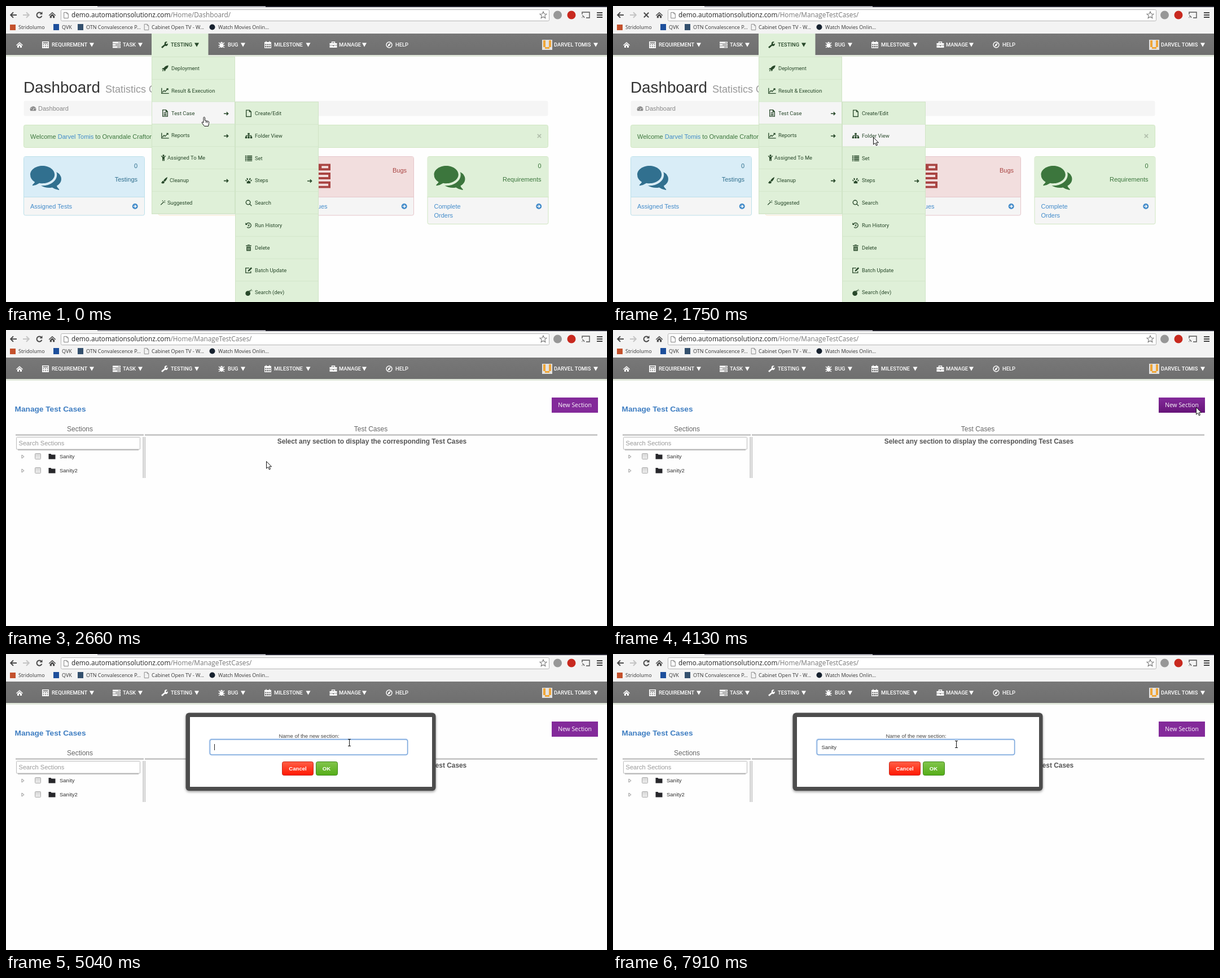
These frames come from a looping animation (1065 px wide and 526 px high, 8 s). An HTML page with a canvas:

```html
<!DOCTYPE html>
<html lang="en">
<head>
<meta charset="utf-8">
<title>Section manager demo</title>
<style>
html, body { margin: 0; width: 100%; height: 100%; overflow: hidden; background: #fff; }
canvas { display: block; }
</style>
</head>
<body>
<canvas id="stage" width="1065" height="526"></canvas>
<script>
const ctx = document.getElementById('stage').getContext('2d');
const LOOP = 8000, STEP = 70;
const ARIAL = '"Liberation Sans", sans-serif';
const SEGOE = '"Open Sans", sans-serif';
const MENU = 'Roboto, sans-serif';
const GREEN = '#dff0d8', DARK = '#28482a', LINK = '#428bca';

// Each icon: [filled path, stroked path], centred on 0,0.
const ICONS = {
  home: ['M-6 .5L0-5L6 .5L5 1.5L0-3L-5 1.5ZM-4 1.8L0-2L4 1.8V5H1V2H-1V5H-4Z'],
  calc: ['M-6-6H6V6H-6ZM-4.5-4.5V-2.5H4.5V-4.5ZM-4.5-1V.5H-2.5V-1ZM-1-1V.5H1V-1ZM2.5-1V.5H4.5V-1ZM-4.5 2.5V4H-2.5V2.5ZM-1 2.5V4H1V2.5ZM2.5 2.5V4H4.5V2.5Z'],
  bars: ['M-7-5.5H7V-2.5H-7ZM3-4.5V-3.5H6V-4.5ZM-7-1.5H7V1.5H-7ZM-2-.5V.5H6V-.5ZM-7 2.5H7V5.5H-7ZM1 3.5V4.5H6V3.5Z'],
  wrench: ['M-6 4L0-1C-1-4 2-7 5-5L2-3L3-1L6-2.5C6 2 3 3 1 1.5L-4 6Z'],
  bug: ['M-2-3C-2-6 2-6 2-3ZM-3-2.5H3V2C3 6-3 6-3 2Z', 'M-5.5 1H5.5M-5-4L-2-1.5M5-4L2-1.5M-5 5L-2 3M5 5L2 3'],
  calendar: ['M-6-5H6V6H-6ZM-5-1.5V.5H-2.5V-1.5ZM-1.5-1.5V.5H1.5V-1.5ZM2.5-1.5V.5H5V-1.5ZM-5 2V4.5H-2.5V2ZM-1.5 2V4.5H1.5V2ZM2.5 2V4.5H5V2Z', 'M-3-6.5V-4M3-6.5V-4'],
  bag: ['M-6.5-3H6.5V.5H-6.5ZM-6.5 1.3H-1V2.5H1V1.3H6.5V5H-6.5Z', 'M-2.5-3V-5H2.5V-3'],
  compass: ['M3-3.5L1 1.5L-3 3.5L-1-1.5Z', 'M5 0A5 5 0 1 1-5 0A5 5 0 1 1 5 0'],
  rocket: ['M6-5.5C2-5.5-1-3-2.5-.5L-5-.3L-6 2L-3.5 1.8L-1.5 3.8L-1.6 5.5L.6 4.5L.8 2.2C4 .5 6-2 6-5.5ZM-5.5 5.5L-4.5 2.6L-2.5 4.4Z'],
  chart: ['', 'M-6.5-5V5H7M-5 3L-2-.5L0 1.5L5-4M2.5-4H5.3V-1.2'],
  file: ['', 'M-4.5-6H1.5L4.5-3V6H-4.5ZM1.5-6V-3H4.5'],
  text: ['', 'M-4.5-6H1.5L4.5-3V6H-4.5ZM1.5-6V-3H4.5M-2.5-1H2.5M-2.5 1.3H2.5M-2.5 3.5H2.5'],
  child: ['M-1.7-4.5A1.7 1.7 0 1 1 1.7-4.5A1.7 1.7 0 1 1-1.7-4.5ZM-4-4.5L-1.5-2.3H1.5L4-4.5L4.5-3.5L2-.8V5.5H.4V2H-.4V5.5H-2V-.8L-4.5-3.5Z'],
  brush: ['M6-6C3-5 0-2 -1.5 .5L.8 2.5C3 1 5-2 6-6ZM-2 1C-4.5 1-4 4-6 4.5C-4 7 1 6 .3 3Z'],
  magic: ['', 'M-4 4L2-2M-1-4L0-3M4-4L3-3M4 0L3-1'],
  sitemap: ['M-1.8-5H1.8V-2H-1.8ZM-6.5 1.5H-3V5H-6.5ZM-1.8 1.5H1.8V5H-1.8ZM3 1.5H6.5V5H3Z', 'M0-2V2M-4.7 2V-.2H4.7V2'],
  list: ['M-6.5-5H-4V-3H-6.5ZM-3-5H6.5V-3H-3ZM-6.5-1.9H-4V.1H-6.5ZM-3-1.9H6.5V.1H-3ZM-6.5 1.2H-4V3.2H-6.5ZM-3 1.2H6.5V3.2H-3ZM-6.5 4.2H-4V5.5H-6.5ZM-3 4.2H6.5V5.5H-3Z'],
  paw: ['M0 0C3 1 5 5 2.5 5.2C1 5.4-1 5.4-2.5 5.2C-5 5-3 1 0 0ZM-3.5-4.5C-1.5-5.5-.3-1.5-1.7-1C-3.2-.6-4.3-4-3.5-4.5ZM3.5-4.5C1.5-5.5 .3-1.5 1.7-1C3.2-.6 4.3-4 3.5-4.5ZM-6-1.5C-4.5-2-2.8 .8-3.8 1.5C-5 2-6.6-1-6-1.5ZM6-1.5C4.5-2 2.8 .8 3.8 1.5C5 2 6.6-1 6-1.5Z'],
  search: ['', 'M3-1A4 4 0 1 1-5-1A4 4 0 1 1 3-1M2 2L5.5 5.5'],
  history: ['M-6-5V-.8H-1.8Z', 'M-4-2.5A4.6 4.6 0 1 1-3 3.6M.5-2.5V.8H-1.5'],
  trash: ['M-5-4.5H5V-3H-5ZM-2-6H2V-4H-2ZM-4-2H4V6H-4ZM-2.3-.5V4.5H-1.5V-.5ZM-.4-.5V4.5H.4V-.5ZM1.5-.5V4.5H2.3V-.5Z'],
  edit: ['M-1.5 2.5L-1 0L4.5-5.5L6.5-3.5L1 2Z', 'M1-4H-5.5V5H4V2'],
  bomb: ['M-6 1.5A4.6 4.6 0 1 1 3.2 1.5A4.6 4.6 0 1 1-6 1.5ZM1-4L3-2L2-1L0-3Z', 'M2-2.5L4-4.5M5-6V-5M6.5-3.5H5.5'],
  folder: ['M-6-5H-2L-1-3.5H6V4.5H-6Z'],
  go: ['M-5 0A5 5 0 1 1 5 0A5 5 0 1 1-5 0ZM-3-.8V.8H.3L-1 2.1L0 3.1L3.1 0L0-3.1L-1-2.1L.3-.8Z'],
  gauge: ['M-5 4.5A5.7 5.7 0 1 1 5 4.5ZM-.8 2.8H1L1.8-2.5ZM-4-.2H-2.8V1H-4ZM-2.7-3H-1.5V-1.8H-2.7ZM3-.2H4.2V1H3Z'],
  chat: ['M-27.5-5.9C-27.5-14.5-18-21.6-5.9-21.6S15.7-14.5 15.7-5.9S6.2 9.8-5.9 9.8Q-8.6 9.8-11.3 9.3Q-16.5 13-23 13.7Q-24.4 13.5-23.5 12.2Q-20.5 9.5-19.3 7.6Q-27.5 2.6-27.5-5.9ZM27.5 2Q27.5 9.5 19.3 14.3Q20.5 17.4 23.5 20Q24.4 21.4 23 21.6Q16.5 20.8 11.3 17.1Q8.6 17.6 5.9 17.6Q-2.4 17.6-8.6 13.6Q4 14.2 11.7 8.4C18.5 3.5 21.2-3.5 18.9-10.6Q27.5-6 27.5 2Z'],
  down: ['M-4-3.4H4L0 3.8Z'],
  right: ['', 'M-4 0H3M.8-2.7L3.6 0L.8 2.7'],
  back: ['', 'M6 0H-4.5M0-4.7L-4.8 0L0 4.7'],
  reload: ['M5.5-6V-1H.5Z', 'M3.2-3.4A4.6 4.6 0 1 0 4.5 1.5'],
  stop: ['', 'M-4.2-4.2L4.2 4.2M4.2-4.2L-4.2 4.2'],
  star: ['', 'M0-6L1.8-2L6-1.7L2.8 1.2L3.8 5.5L0 3.2L-3.8 5.5L-2.8 1.2L-6-1.7L-1.8-2Z'],
  screen: ['', 'M-6-1V-5H7V5H1M-6 5V4M-6 1.5A3.5 3.5 0 0 1-2.5 5'],
  menu: ['M-5-5H5V-3H-5ZM-5-1H5V1H-5ZM-5 3H5V5H-5Z']
};
for (const name in ICONS) ICONS[name] = ICONS[name].map(d => new Path2D(d));

const CURSORS = {
  arrow: new Path2D('M0 0V12.5L3 10L5 14.5L7 13.5L5 9.3H9Z'),
  hand: new Path2D('M-1.5 1C-1.5-.5 1-.5 1 1V6L7 7.5C8.5 8 8.5 9 8 11L7 16H0L-4 10.5C-5 9-3.5 8-2.5 9L-1.5 10Z'),
  beam: new Path2D('M-2.5-6H2.5M0-6V6M-2.5 6H2.5')
};

// Pointer track: time, x, y.
const TRACK = [
  [70, 351, 197], [490, 420, 196], [910, 461, 233], [3150, 461, 233], [3500, 1033, 137],
  [4200, 1033, 137], [4410, 1027, 139], [4480, 1025, 140], [4900, 608, 153],
  [5040, 608, 157], [5250, 608, 157], [5320, 608, 160]
];
const TYPING = [[0, ''], [5950, 'S'], [6230, 'Sa'], [6300, 'San'], [6510, 'Sant'], [6930, 'San'],
  [7000, 'Sani'], [7210, 'Sanit'], [7420, 'Sanity']];

function text(str, x, y, font, color, align = 'left') {
  ctx.font = font;
  ctx.fillStyle = color;
  ctx.textAlign = align;
  ctx.fillText(str, x, y);
  return x + ctx.measureText(str).width;
}

function rect(x, y, w, h, color) {
  ctx.fillStyle = color;
  ctx.fillRect(x, y, w, h);
}

function box(x, y, w, h, fill, line, r = 3, width = 1) {
  ctx.beginPath();
  ctx.roundRect(x + .5, y + .5, w - 1, h - 1, r);
  ctx.fillStyle = fill;
  ctx.fill();
  if (line) {
    ctx.strokeStyle = line;
    ctx.lineWidth = width;
    ctx.stroke();
  }
}

function disc(x, y, r, color) {
  ctx.beginPath();
  ctx.arc(x, y, r, 0, 7);
  ctx.fillStyle = color;
  ctx.fill();
}

function icon(name, x, y, color, scale = 1, width = 1.4) {
  const [solid, line] = ICONS[name];
  ctx.save();
  ctx.translate(x, y);
  ctx.scale(scale, Math.abs(scale));
  ctx.fillStyle = ctx.strokeStyle = color;
  ctx.lineWidth = width;
  ctx.fill(solid, 'evenodd');
  if (line) ctx.stroke(line);
  ctx.restore();
}

function shade(y, h, top, bottom) {
  const g = ctx.createLinearGradient(0, y, 0, y + h);
  g.addColorStop(0, top);
  g.addColorStop(1, bottom);
  return g;
}

function pointer(t) {
  const i = TRACK.findIndex(k => k[0] > t);
  if (i === 0) return TRACK[0].slice(1);
  if (i < 0) return TRACK.at(-1).slice(1);
  const [t0, x0, y0] = TRACK[i - 1], [t1, x1, y1] = TRACK[i];
  const p = (t - t0) / (t1 - t0), e = p * p * (3 - 2 * p);
  return [x0 + (x1 - x0) * e, y0 + (y1 - y0) * e];
}

function browser(t) {
  const ink = '#4a4a4a', small = '9px ' + SEGOE;
  rect(0, 0, 1065, 49, '#f3f3f3');
  rect(162, 0, 300, 2, '#9b9ba3');
  rect(460, 0, 605, 2, '#22222c');
  icon('back', 13, 16, ink, 1, 2);
  icon('back', 36, 16, '#c4c4c4', -1, 2);
  icon(t >= 1540 && t < 2380 ? 'stop' : 'reload', 59, 16, ink, 1, 2);
  icon('home', 82, 16, ink, 1.05);
  box(97, 6, 866, 21, '#fff', '#b4b4b4', 2);
  icon('file', 106.5, 16.5, '#777', .85, 1.1);
  const x = text('demo.automationsolutionz.com', 116, 20, '11.75px ' + SEGOE, '#222');
  text(t < 1680 ? '/Home/Dashboard/' : '/Home/ManageTestCases/', x, 20, '11.75px ' + SEGOE, '#777');
  icon('star', 952, 16, '#777', 1, 1.1);
  disc(977.5, 16, 7.5, '#979797');
  disc(1002, 16, 7.5, '#c8291f');
  icon('screen', 1027, 16, '#555', 1, 1.4);
  icon('menu', 1052, 16, '#444');

  rect(7, 33, 10, 10, '#c4512c');
  text('Stridolumo', 22, 41, small, '#333');
  rect(84, 32, 10, 11, '#1d4f9c');
  text('QVK', 99, 41, small, '#333');
  rect(127, 32, 10, 11, '#34506e');
  text('OTN Convalescence P...', 142, 41, small, '#333');
  icon('file', 249, 37.5, '#888', .85, 1.1);
  text('Cabinet Open TV - W...', 258, 41, small, '#333');
  disc(365.5, 37.5, 5, '#17222f');
  text('Watch Movies Onlin...', 376, 41, small, '#333');
}

function navbar(open) {
  const font = '500 9.4px ' + MENU;
  rect(0, 49, 1065, 38, shade(49, 38, '#787878', '#6f6f6f'));
  rect(0, 87, 1065, 3, '#e1e8db');
  icon('home', 24, 69, '#fff');
  const items = [['calc', 70, 'REQUIREMENT', 81, 152], ['bars', 196, 'TASK', 207, 238], ['wrench', 281, 'TESTING', 292, 338],
    ['bug', 382, 'BUG', 393, 420], ['calendar', 464, 'MILESTONE', 475, 535.5], ['bag', 580, 'MANAGE', 590, 635], ['compass', 679, 'HELP', 690]];
  for (const [name, ix, label, tx, arrow] of items) {
    const active = open && label === 'TESTING', color = active ? DARK : '#fff';
    if (active) rect(258, 49, 100.5, 41, GREEN);
    icon(name, ix, 69, color);
    text(label, tx, 72.3, font, color);
    if (arrow) icon('down', arrow, 69, color);
  }
  rect(950, 60, 18, 18, '#e4e2e0');
  rect(952, 61, 4, 12, '#efa637');
  rect(962, 61, 4, 12, '#efa637');
  rect(955, 73, 8, 3, '#efa637');
  text('DARVEL TOMIS', 971, 72.3, font, '#fff');
  icon('down', 1045, 69, '#fff');
}

function card(x, h, head, line, ink, big, name, count, links) {
  const right = x + 202, font = '11px ' + ARIAL, chat = big === 'chat';
  box(x, 267, 215, h, '#f5f5f5', line);
  rect(x + 1, 268, 213, 71, head);
  rect(x, 339, 215, 1, line);
  icon(big, x + 39.5, chat ? 305.5 : 302, ink, chat ? 1 : 3.93);
  text(count, right, 288, font, ink, 'right');
  text(name, right, count ? 311.5 : 295.5, font, ink, 'right');
  links.forEach((s, i) => text(s, x + 12, 360 + i * 15.5, font, LINK));
  icon('go', x + 197.7, 356, LINK);
}

function dashboard() {
  const font = '11px ' + ARIAL;
  text('Dashboard', 31, 154, '27.8px ' + ARIAL, '#333');
  text('Statistics Overview', 176, 154, '18px ' + ARIAL, '#999');
  box(31, 168, 930, 28, '#f5f5f5');
  icon('gauge', 48, 182, '#888', .95);
  text('Dashboard', 57, 186, font, '#888');
  box(31, 211, 930, 41, GREEN, '#d0e6c2');
  let x = text('Welcome ', 43, 235.5, font, '#3c763d');
  x = text('Darvel Tomis', x, 235.5, font, LINK);
  text(' to Orvandale Craftorium', x, 235.5, font, '#3c763d');
  icon('stop', 945, 231, '#b3c0ad', .75, 2.4);
  card(31, 105.5, '#d9edf7', '#bce0ea', '#31708f', 'chat', 'Testings', '0', ['Assigned Tests']);
  card(269.5, 105.5, '#fcf8e3', '#faebcc', '#8a6d3b', 'bars', '', '', []);
  card(508, 105.5, '#f2dede', '#e6c5ca', '#a94442', 'bars', 'Bugs', '', ['My Issues']);
  card(746.5, 121, GREEN, '#d0e6c2', '#3c763d', 'chat', 'Requirements', '0', ['Complete', 'Orders']);
}

function menu(x, y, rows, active, arrows) {
  const step = 39.8;
  rect(x, y, 148, rows.length * step + 1, GREEN);
  rows.forEach(([name, label, ix, tx], i) => {
    const top = y + i * step, mid = top + 20.8;
    if (i === active) rect(x + 1, top + 1, 147, step - 1, '#f5f5f5');
    rect(x, top + step, 148, 1, '#d3e6ca');
    icon(name, ix, mid, DARK, .95);
    text(label, tx, mid + 3.2, '9.4px ' + MENU, DARK);
    if (arrows.includes(i)) icon('right', x + 132, mid + .8, DARK, 1, 1.6);
  });
  ctx.strokeStyle = '#d0e4c6';
  ctx.lineWidth = 1;
  ctx.strokeRect(x + .5, y + .5, 147, rows.length * step);
}

function menus(px, py) {
  menu(258, 90, [['rocket', 'Deployment', 282, 293], ['chart', 'Result & Execution', 282, 293], ['text', 'Test Case', 282, 293],
    ['chart', 'Reports', 282, 293], ['child', 'Assigned To Me', 279, 286], ['brush', 'Cleanup', 280.5, 290],
    ['magic', 'Suggested', 278, 286]], 2, [2, 3, 5]);
  const names = ['file', 'sitemap', 'list', 'paw', 'search', 'history', 'trash', 'edit', 'bomb'];
  const labels = ['Create/Edit', 'Folder View', 'Set', 'Steps', 'Search', 'Run History', 'Delete', 'Batch Update', 'Search (dev)'];
  const hover = px > 406 ? Math.floor((py - 170) / 39.8) : -1;
  menu(406, 170, labels.map((s, i) => [names[i], s, 430, 441]), hover, [3]);
}

function sections(t, px, py) {
  const grey = '#c9c9c9', font = '12px ' + ARIAL;
  text('Manage Test Cases', 15.5, 144.5, 'bold 13.7px ' + ARIAL, '#3f7ec2');
  text('Sections', 131, 180, font, '#666', 'center');
  text('Test Cases', 646.5, 180, font, '#666', 'center');
  rect(17, 185, 227, 3, grey);
  rect(246, 185, 802, 3, grey);
  text('Select any section to display the corresponding Test Cases', 648.5, 202, 'bold 11.9px ' + ARIAL, '#555', 'center');
  const hover = px > 967 && py > 120 && py < 147 && t > 3400;
  const fill = !hover ? '#832a9a' : t >= 4200 ? '#6c177f' : shade(120, 27, '#832a9a', '#661478');
  rect(967, 120, 82, 27, fill);
  text('New Section', 1008, 137.3, '10.4px ' + SEGOE, '#fff', 'center');
  const loaded = t >= 2520, bottom = loaded ? 263 : 213;
  rect(242.5, 190, 1.5, bottom - 190, '#bbb');
  rect(245.5, 190, 1.5, bottom - 190, '#bbb');
  rect(21, 212, 214, 2.5, shade(212, 2.5, '#999', '#eee'));
  box(18, 190, 220, 22.5, '#fff', '#bbb', 1);
  text('Search Sections', 22.5, 205.3, '11.1px ' + ARIAL, '#999');
  if (!loaded) return;
  ['Sanity', 'Sanity2'].forEach((label, i) => {
    const y = 225 + i * 25;
    ctx.strokeStyle = '#888';
    ctx.lineWidth = .9;
    ctx.stroke(new Path2D(`M28 ${y - 3}L32 ${y}L28 ${y + 3}Z`));
    box(51, y - 6, 11, 11, shade(y - 6, 11, '#d5d5d5', '#eee'), '#aaa', 1);
    icon('folder', 81.5, y, '#27272b');
    text(label, 95, y + 3.2, '9.5px ' + ARIAL, '#333');
  });
}

function dialog(t) {
  const p = Math.min(1, (t - 4190) / 500), u = p - 1;
  if (p <= 0) return;
  const ease = 1 + 2.70158 * u ** 3 + 1.70158 * u ** 2;
  const focus = p === 1, bold = 'bold 9.6px ' + ARIAL;
  ctx.save();
  ctx.beginPath();
  ctx.rect(0, 49, 1065, 477);
  ctx.clip();
  ctx.globalAlpha = Math.max(0, Math.min(1, ease));
  ctx.translate(0, Math.round((ease - 1) * 115));
  ctx.shadowColor = 'rgba(0,0,0,.4)';
  ctx.shadowBlur = 4;
  ctx.shadowOffsetY = 2;
  box(318, 104, 444, 139.5, '#4c4c4c', '', 6);
  ctx.shadowColor = 'transparent';
  rect(326, 112, 429, 124, '#fff');
  text('Name of the new section:', 537, 148.5, '9.5px ' + ARIAL, '#444', 'center');
  if (focus) box(360, 150.5, 352.5, 29.5, '#fff', '#cfe0f6', 4, 2);
  box(361, 151.5, 351, 28, '#fff', focus ? '#7ea9dd' : '#c4c4c4', 3, focus ? 1.4 : 1);
  box(489, 191, 56, 25, shade(191, 25, '#ff6047', '#ff1600'), '#c9281a');
  text('Cancel', 517, 207, bold, '#fff', 'center');
  box(549, 191, 39, 25, shade(191, 25, '#83c54d', '#54ad17'), '#3f8a1c');
  text('OK', 568, 207, bold, '#fff', 'center');

  const [typedAt, typed] = TYPING.findLast(k => k[0] <= t);
  const end = text(typed, 369.5, 168.5, '9.5px ' + ARIAL, '#333');
  const since = t - (typedAt || 4690);
  if (focus && since % 910 < 490) rect(Math.floor(end), 160, 1, 11, '#222');
  ctx.restore();
}

function cursor(t, x, y) {
  const inField = t > 4200 && x > 361 && x < 712 && y > 151 && y < 180;
  const shape = inField ? 'beam' : t < 1540 ? 'hand' : 'arrow';
  ctx.save();
  ctx.translate(Math.round(x) + .5, Math.round(y) + .5);
  ctx.fillStyle = '#fff';
  ctx.strokeStyle = '#111';
  ctx.lineWidth = 1;
  if (shape !== 'beam') ctx.fill(CURSORS[shape]);
  ctx.stroke(CURSORS[shape]);
  if (shape === 'hand') ctx.stroke(new Path2D('M3 7V10M5.5 8V10.5'));
  ctx.restore();
}

function draw(now) {
  const t = Math.floor(now % LOOP / STEP) * STEP;
  const [x, y] = pointer(t), first = t < 1960;
  rect(0, 0, 1065, 526, '#fefefe');
  if (first) dashboard();
  else if (t >= 2100) sections(t, x, y);
  navbar(first);
  if (first) menus(x, y);
  browser(t);
  dialog(t);
  cursor(t, x, y);
  requestAnimationFrame(draw);
}
requestAnimationFrame(draw);
</script>
</body>
</html>
```
